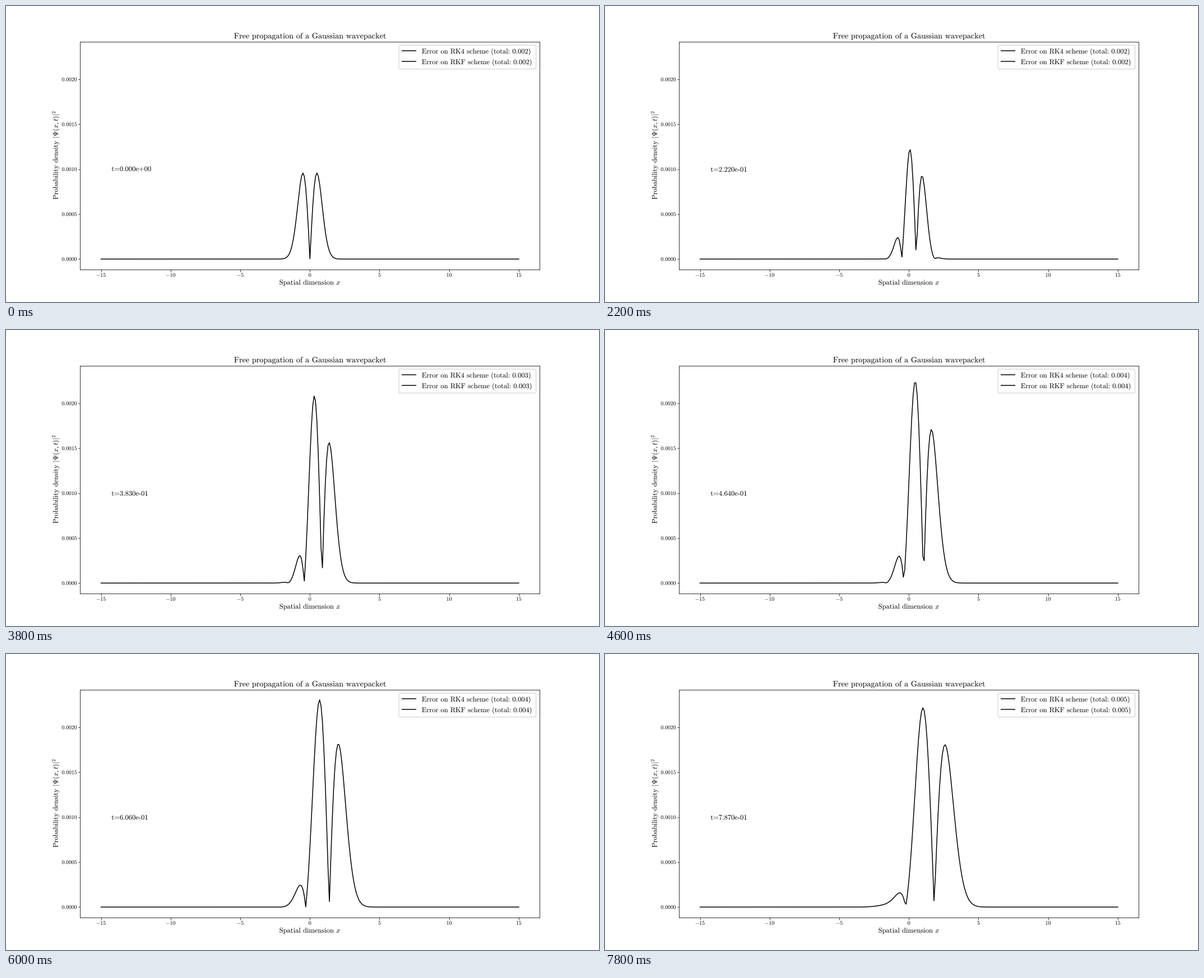
A matplotlib script that plays this animation: 1058x529 px, repeating every 8000 ms.

```python
import numpy as np
import matplotlib.pyplot as plt
from matplotlib.animation import FuncAnimation
from matplotlib.lines import Line2D
from matplotlib.patches import FancyBboxPatch, PathPatch
from matplotlib.textpath import TextPath
from matplotlib.transforms import Affine2D

plt.rcParams["mathtext.fontset"] = "cm"

W, H = 1058, 529
FRAMES, INTERVAL = 40, 200
DT, DX = 1e-3, 0.1
TEXT, TITLE, TICK = 12.5, 14.2, 9.8  # font sizes in pixels

x = np.linspace(-15, 15, 301)


# --- physics -------------------------------------------------------------

def slope(psi):
    """Free Schroedinger equation with a three-point Laplacian."""
    lap = -2 * psi
    lap[1:] += psi[:-1]
    lap[:-1] += psi[1:]
    return 0.5j * lap / DX**2


def rk4_step(psi):
    k1 = slope(psi)
    k2 = slope(psi + DT / 2 * k1)
    k3 = slope(psi + DT / 2 * k2)
    k4 = slope(psi + DT * k3)
    return psi + DT / 6 * (k1 + 2 * k2 + 2 * k3 + k4)


def exact_density(t):
    var = 0.25 + t**2
    return np.exp(-(x - t)**2 / (2 * var)) / np.sqrt(2 * np.pi * var)


def density_errors(steps):
    """The numerical state runs one time step ahead of the exact one."""
    psi = (2 / np.pi)**0.25 * np.exp(-x**2 + 1j * x)
    errors = []
    for n in range(steps[-1] + 1):
        psi = rk4_step(psi)
        if n in steps:
            errors.append(np.abs(np.abs(psi)**2 - exact_density(n * DT)))
    return np.array(errors)


steps = [2000 * i // 99 for i in range(FRAMES)]
errors = density_errors(steps)
totals = errors.sum(axis=1) * DX


# --- text ----------------------------------------------------------------

def roman(s):
    """Upright math text with the spacing of plain text."""
    for char in "=:":
        s = s.replace(char, rf"\hspace{{-0.2}}{char}\hspace{{-0.2}}")
    s = s.replace("+", "{+}").replace(" ", r"\hspace{0.38}")
    return rf"\mathrm{{{s}}}"


def outline(s, size=TEXT):
    return TextPath((0, 0), f"${s}$", size=size)


# --- figure --------------------------------------------------------------

fig = plt.figure(figsize=(W / 72, H / 72), dpi=72, facecolor="white")
ax = fig.add_axes([0.125, 0.11, 0.775, 0.7699])
pixels = Affine2D().scale(1 / W, -1 / H).translate(0, 1) + fig.transFigure


def put(px, py, s, size=TEXT, align=0, angle=0):
    """Text on a baseline; align is 0 left, 0.5 centre, 1 right."""
    path = outline(s, size)
    box = path.get_extents()
    shift = align and box.x0 + align * box.width
    place = (Affine2D().translate(-shift, 0).rotate_deg(angle)
             .scale(1, -1).translate(px, py))
    return fig.add_artist(PathPatch(path, fc="black", lw=0, zorder=6,
                                    transform=place + pixels))


def rule(x0, x1, y, width):
    line = Line2D([x0, x1], [y, y], color="black", lw=width,
                  transform=pixels, solid_capstyle="butt", zorder=6)
    return fig.add_artist(line)


peak = errors.max()
ax.set_xlim(-16.5, 16.5)
ax.set_ylim(-0.05 * peak, 1.05 * peak)
xticks = range(-15, 16, 5)
yticks = [0.0005 * i for i in range(5)]
ax.set_xticks(xticks)
ax.set_yticks(yticks)
ax.tick_params(length=3.5, width=0.8, labelbottom=False, labelleft=False)
for v in xticks:
    px, _ = ax.transData.transform((v, 0))
    put(px, 483.8, roman(str(v)), TICK, align=0.5)
for v in yticks:
    _, py = ax.transData.transform((0, v))
    put(126.2, H - py + 3.2, roman(f"{v:.4f}"), TICK, align=1)

curve, = ax.plot(x, errors[0], color="black", lw=1.5)

put(542.4, 58, roman("Free propagation of a Gaussian wavepacket"), TITLE,
    align=0.5)
put(542, 498, roman("Spatial dimension ") + "x", align=0.5)
put(92.5, 267, roman("Probability density ") + r"|\Psi(x,t)|^2",
    align=0.5, angle=90)

# legend
fig.add_artist(FancyBboxPatch(
    (701, 70), 244.7, 42.6, boxstyle="round,pad=0,rounding_size=2.6",
    fc="white", ec="0.8", lw=1, transform=pixels, zorder=5))
schemes = ["RK4", "RKF"]
entries = []
for row, name in enumerate(schemes):
    rule(706, 732, 80.2 + 19 * row, 1.5)
    entries.append(put(741.8, 84.9 + 19.1 * row, roman(name)))

# clock, with a hyphen drawn in the exponent
CLOCK_X = 188.3
clocks = {"+": put(CLOCK_X, 295, "t"), "-": put(CLOCK_X, 296, "t")}
hyphen = rule(CLOCK_X + 3.9 * TEXT, CLOCK_X + 4.17 * TEXT, 293.3, 0.8)
hyphen.set_snap(False)


def update(i):
    curve.set_ydata(errors[i])
    for entry, name in zip(entries, schemes):
        label = f"Error on {name} scheme (total: {totals[i]:.3f})"
        entry.set_path(outline(roman(label)))
    label = f"t={steps[i] / 1000:.3e}"
    for sign, clock in clocks.items():
        clock.set_visible(sign in label)
        clock.set_path(outline(roman(label.replace("-", " "))))
    hyphen.set_visible("-" in label)
    return [curve, *entries, *clocks.values(), hyphen]


anim = FuncAnimation(fig, update, frames=FRAMES, interval=INTERVAL,
                     repeat=True, repeat_delay=0, blit=False)
plt.show()
```
